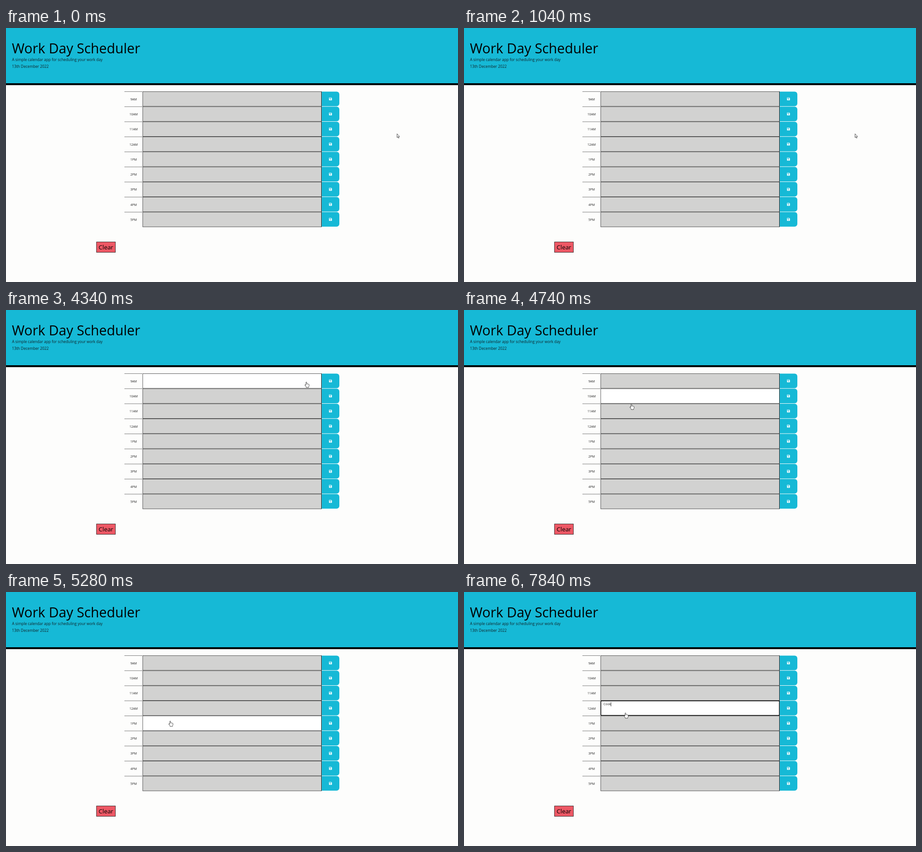
Recreate the animation shown at these times as an HTML page. Size 998 by 561 pixels, loop 8000 ms.

```html
<!DOCTYPE html>
<html lang="en">
<head>
<meta charset="utf-8">
<title>Work Day Scheduler</title>
<style>
  html, body { margin: 0; width: 100%; height: 100%; overflow: hidden; background: #fdfdfc; }
  svg { display: block; width: 100%; height: 100%; font-family: "Open Sans", sans-serif; }
</style>
</head>
<body>
<svg id="stage" viewBox="0 0 998 561">
  <rect width="998" height="122" fill="#16b9d6"/>
  <rect y="122" width="998" height="4.2" fill="#000"/>
  <text x="13" y="56" font-size="30.15">Work Day Scheduler</text>
  <g font-size="8.317" fill="#12242a">
    <text x="13.2" y="73.3">A simple calendar app for scheduling your work day</text>
    <text x="13.2" y="87.7">13th December 2022</text>
  </g>
  <g id="rows"></g>
  <rect id="focus" x="302.3" y="240.5" width="394" height="32" rx="1.5" fill="#fff" stroke="#111" stroke-width="1.5"/>
  <text id="typed" x="308.1" y="250.3" font-size="6.76" fill="#222"></text>
  <rect id="caret" y="243.3" width="0.8" height="9.2"/>
  <rect x="199.8" y="472.6" width="41.8" height="22.8" fill="#ee5865" stroke="#222" stroke-width="0.9"/>
  <text x="220.7" y="488.8" font-size="13.4" text-anchor="middle">Clear</text>
  <g id="arrow" fill="#fff" stroke="#222" stroke-width="0.8" stroke-linejoin="round">
    <path d="M.4 .5V8.8L2.2 7.1L3.5 10L4.9 9.4L3.6 6.6H6Z"/>
  </g>
  <g id="hand" fill="#fff" stroke="#222" stroke-width="0.8" stroke-linejoin="round">
    <path d="M-1 1Q0 -.4 1 1V4.6Q2 3.8 2.8 4.8Q3.8 4.2 4.5 5.2Q5.7 4.9 6 6V8.6Q5.8 10 5 11V12.3H-.4V11.2L-3.2 7.5Q-3.7 6.2 -2.4 6.3L-1 7.4Z"/>
  </g>
</svg>
<script>
const LOOP = 8000, TOP = 140.2, PITCH = 33.27;
const LABELS = ["9AM", "10AM", "11AM", "12AM", "1PM", "2PM", "3PM", "4PM", "5PM"];
const FOCUS_AT = 6060, KEYS = [7040, 7410, 7540, 7810], WORD = "Cook";
const HOVER_LAG = 50;

// Pointer path: time, x, y
const PATH = [
  [0, 863, 233.2], [2705, 863, 233.2], [2740, 863.5, 231.2],
  [3270, 829, 222], [3510, 829, 222], [3970, 749, 196], [4170, 749, 196],
  [4340, 663.8, 158.7], [4740, 369.6, 207.4], [4940, 361, 252],
  [5280, 362.6, 284.6], [5740, 356.5, 266.5], [LOOP, 356.5, 266.5]
];

const $ = id => document.getElementById(id);
const show = (el, on) => el.setAttribute("visibility", on ? "visible" : "hidden");

function row(label, i) {
  const y = TOP + i * PITCH;
  return `
    <path d="M262 ${y + 0.3}H301.5" stroke="#222" stroke-width="0.9" stroke-dasharray="2 1"/>
    <text x="281.8" y="${y + 19.6}" font-size="6.76" text-anchor="middle" fill="#222">${label}</text>
    <rect class="slot" x="301.9" y="${y + 0.4}" width="394.6" height="32.4" fill="#d2d2d1" stroke="#444" stroke-width="0.9"/>
    <path d="M696.6 ${y}V${y + 33}" stroke="#111" stroke-width="1.1"/>
    <path d="M697.2 ${y + 0.2}H730a6 6 0 0 1 6 6V${y + 26.5}a6 6 0 0 1 -6 6H697.2Z" fill="#16b9d6"/>
    <g transform="translate(713.2 ${y + 13.2})">
      <path d="M.7 0H4.9L6.4 1.5V5.7Q6.4 6.4 5.7 6.4H.7Q0 6.4 0 5.7V.7Q0 0 .7 0Z" fill="#fff"/>
      <path d="M.9 .9H4.6V2.5H.9Z" fill="#16b9d6"/>
      <circle cx="3.2" cy="4.4" r=".95" fill="#16b9d6"/>
    </g>`;
}
$("rows").innerHTML = LABELS.map(row).join("");
const slots = [...document.querySelectorAll(".slot")];

const slope = (i, k) => (PATH[i + 1][k] - PATH[i][k]) / (PATH[i + 1][0] - PATH[i][0]);

// Tangent that never overshoots; zero at rests and turning points
function tangent(i, k) {
  if (i === 0 || i === PATH.length - 1) return 0;
  const a = slope(i - 1, k), b = slope(i, k);
  return a * b > 0 ? 2 * a * b / (a + b) : 0;
}

function along(t, k) {
  let i = 0;
  while (i < PATH.length - 2 && t >= PATH[i + 1][0]) i++;
  const p = PATH[i], q = PATH[i + 1], d = q[0] - p[0];
  const u = (t - p[0]) / d, v = 1 - u;
  return p[k] * (1 + 2 * u) * v * v + q[k] * u * u * (3 - 2 * u)
    + d * (tangent(i, k) * u * v * v - tangent(i + 1, k) * u * u * v);
}

function pointer(t) {
  const time = Math.max(0, t);
  return { x: along(time, 1), y: along(time, 2) };
}

function rowAt({ x, y }) {
  return x > 302 && x < 697 ? Math.floor((y - TOP) / PITCH) : -1;
}

function draw(t) {
  const p = pointer(t), over = rowAt(pointer(t - HOVER_LAG));
  const inside = p.x > 302 && p.x < 736 && p.y > TOP;
  for (const [id, on] of [["arrow", !inside], ["hand", inside]]) {
    show($(id), on);
    $(id).setAttribute("transform", `translate(${p.x.toFixed(2)} ${p.y.toFixed(2)})`);
  }
  slots.forEach((s, i) => s.setAttribute("fill", i === over ? "#fff" : "#d2d2d1"));

  const focused = t >= FOCUS_AT;
  const count = KEYS.filter(k => t >= k).length;
  show($("focus"), focused);
  $("typed").textContent = WORD.slice(0, count);
  const since = t - (count ? KEYS[count - 1] : FOCUS_AT + 20);
  show($("caret"), since >= 0 && since < 500);
  $("caret").setAttribute("x", 308.1 + (count ? $("typed").getComputedTextLength() : 0));
}

const start = performance.now();
function tick() {
  draw((performance.now() - start) % LOOP);
  requestAnimationFrame(tick);
}
tick();
</script>
</body>
</html>
```
